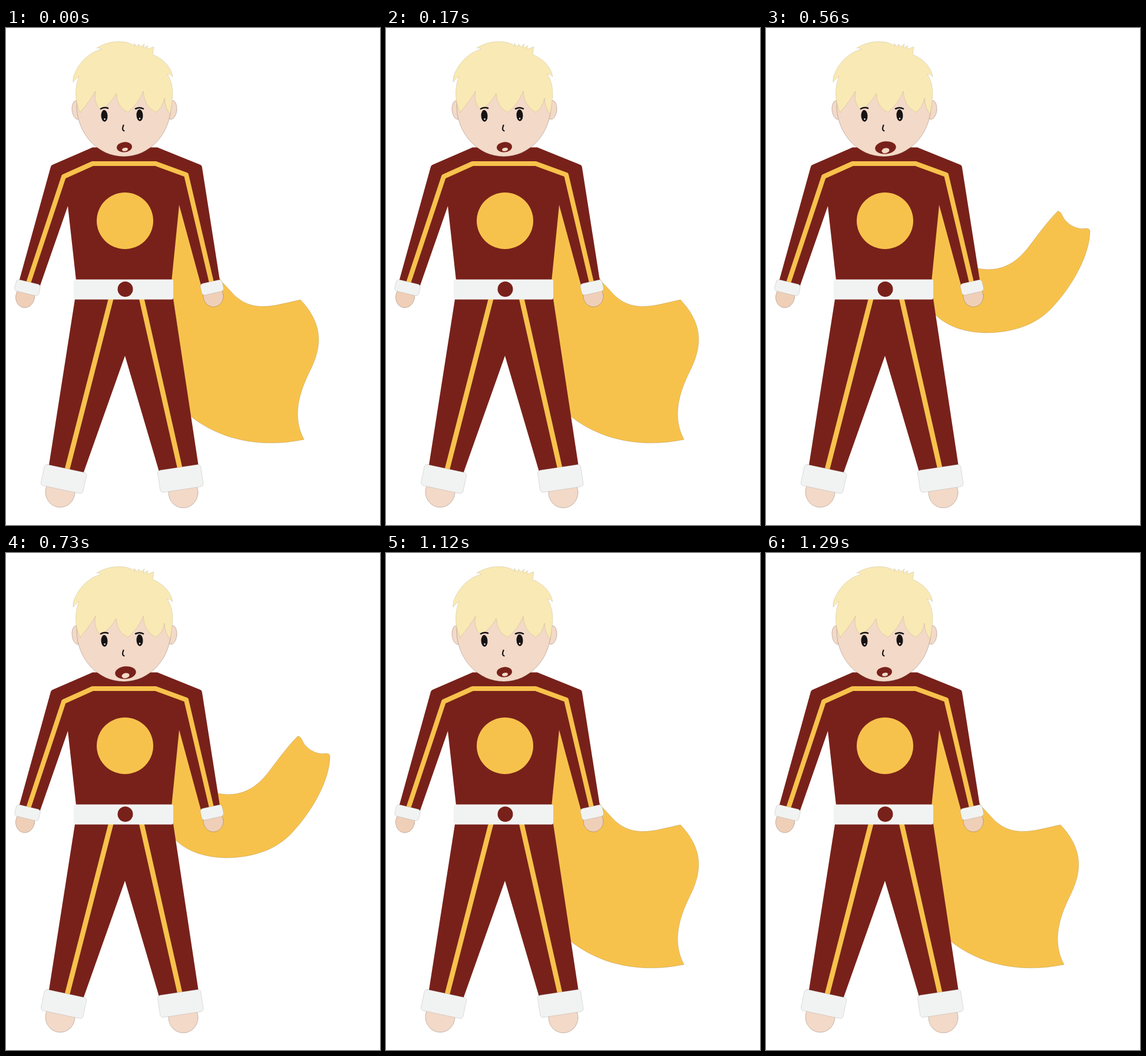
These frames come from a looping animation (635 by 843 pixels, 1.4 s). An HTML page with a canvas:

```html
<!DOCTYPE html>
<html lang="en">
<head>
<meta charset="utf-8">
<title>Caped hero</title>
<style>
  html, body { margin: 0; width: 100%; height: 100%; overflow: hidden; background: #fff; }
  canvas { display: block; }
</style>
</head>
<body>
<canvas id="stage" width="635" height="843"></canvas>
<script>
const ctx = document.getElementById('stage').getContext('2d');

const RED = '#78211a', GOLD = '#f7c24c', WHITE = '#f1f3f2';
const SKIN = '#f3d9c7', HAND = '#efcfb7', HAIR = '#f9e9b4', INK = '#161314';
const EDGE = 'rgba(60,40,30,.45)';

const STEP = 280;
const ORDER = [0, 1, 2, 1, 0];

const POSES = [
  {
    cape: `M294 296 L281 426 L284 460 L313 658 C360 696 428 714 506 698
      C488 664 494 628 513 588 C534 548 544 508 500 461
      C456 470 416 487 381 446 L367 431 L345 400 Z`,
    mouth: [201, 202, 13, 8.6], tongue: [202, 206, 5, 2.8]
  },
  {
    cape: `M294 296 L281 426 L284 460 L298 557 C345 598 400 610 460 606
      C516 603 562 585 612 572 Q615 571 614 568 C611 550 606 533 598 522
      C587 508 563 497 546 486 C526 471 514 454 516 425 Q516 419 510 422
      C478 438 440 453 416 462 C392 470 366 470 348 463
      C328 453 321 432 323 403 L318 385 Z`,
    mouth: [201.5, 202.3, 6.2, 4]
  },
  {
    cape: `M294 296 L281 426 L284 460 L288 487 C310 508 342 517 376 517
      C425 516 461 501 486 474 C519 439 549 387 550 346 Q550 339 543 340
      C531 342 517 337 507 325 C503 319 500 309 495 311
      C478 328 460 353 447 370 C423 402 396 414 361 408 L345 400 Z`,
    mouth: [203, 203, 17.8, 10.7], tongue: [203, 208, 6.6, 4.3]
  }
];

const BODY = `M147 202.5 L257 202.5 L330 232 Q332.5 233 333 237 L363 428 L346 440 L331 436
  L294 300 L281 430 L284 460 L327 744 L261 756 L202 556 L131 756 L72.5 744
  L117 460 L119 428 L105 302 L57.5 438 L22 430 L75.5 237 Q76.5 233 79 232 Z`;

const HAIR_SHAPE = `M126 143 C117 127 116 101 124 82 Q118 86 114 92
  C112 75 134 42 162 36 Q158 33 154 34 C166 26 180 23 192 23
  Q209 23 219 31 L217 26 L224 32 L225 27 L229 32 L235 27 L233 34
  L241 30 L239 36 L251 32 L249 45 C269 53 281 68 283 83 Q279 78 274 78
  Q284 94 283 116 L279 146 Q270 137 269 119 Q266 136 254 143
  Q234 132 233 107 Q225 128 207 143
  Q189 135 187 111 Q178 129 160 139
  Q148 125 152 107 Q143 123 126 143 Z`;

function shape(d, color, edge) {
  const p = new Path2D(d);
  ctx.fillStyle = color;
  ctx.fill(p);
  if (edge) {
    ctx.strokeStyle = edge;
    ctx.lineWidth = 0.6;
    ctx.stroke(p);
  }
}

function line(d, color, width) {
  ctx.strokeStyle = color;
  ctx.lineWidth = width;
  ctx.stroke(new Path2D(d));
}

function oval([x, y, rx, ry], color, turn = 0, edge) {
  ctx.beginPath();
  ctx.ellipse(x, y, rx, ry, turn, 0, Math.PI * 2);
  ctx.fillStyle = color;
  ctx.fill();
  if (edge) {
    ctx.strokeStyle = edge;
    ctx.lineWidth = 0.6;
    ctx.stroke();
  }
}

function cuff(x, y, w, h, turn) {
  ctx.save();
  ctx.translate(x, y);
  ctx.rotate(turn);
  ctx.beginPath();
  ctx.roundRect(-w / 2, -h / 2, w, h, 5);
  ctx.fillStyle = WHITE;
  ctx.fill();
  ctx.strokeStyle = 'rgba(120,110,105,.35)';
  ctx.lineWidth = 0.6;
  ctx.stroke();
  ctx.restore();
}

function drawBody() {
  oval([92, 787, 25, 26], SKIN, 0, EDGE);
  oval([301, 788, 25, 26], SKIN, 0, EDGE);
  oval([32.5, 456, 16, 18.5], HAND, 0.15, EDGE);
  oval([352, 455, 17, 18], HAND, -0.15, EDGE);
  shape(BODY, RED);

  line('M37.5 434 L98 252 L147 230 L254 230 L306 249 L349.5 434', GOLD, 8);
  line('M178.5 458 L103.5 750', GOLD, 8.5);
  line('M230 458 L296 750', GOLD, 8.5);

  cuff(36.5, 440.5, 42, 20, 0.24);
  cuff(349.7, 440, 38, 20, -0.22);
  cuff(98, 765, 73, 36.5, 0.21);
  cuff(296.2, 764, 74, 38, -0.15);

  ctx.fillStyle = WHITE;
  ctx.beginPath();
  ctx.roundRect(115, 426.5, 169, 34, 3);
  ctx.fill();

  // plain badges
  oval([202, 327, 48, 48], GOLD);
  oval([202.5, 443, 13, 13], RED);
}

function drawHead() {
  oval([120.5, 139, 8.5, 16], SKIN, -0.1, EDGE);
  oval([281.5, 139, 8.5, 16], SKIN, 0.1, EDGE);
  oval([200, 131, 80, 87], SKIN, 0, EDGE);
  shape(HAIR_SHAPE, HAIR, 'rgba(90,75,40,.25)');

  line('M161 137 Q167 133.5 173 136', INK, 2.6);
  line('M220 137 Q227 133.5 233 137', INK, 2.6);
  oval([167, 149, 5.5, 10], INK, -0.05);
  oval([227, 148, 5.5, 10], INK, -0.05);
  oval([167.5, 154.5, 1.2, 1.2], '#fff');
  oval([227, 153.5, 1.2, 1.2], '#fff');
  line('M199.5 165 Q196 173 200.5 174.5', INK, 2.2);
}

function draw(now) {
  const pose = POSES[ORDER[Math.floor(now / STEP) % ORDER.length]];
  ctx.fillStyle = '#fff';
  ctx.fillRect(0, 0, 635, 843);
  ctx.lineCap = ctx.lineJoin = 'round';

  shape(pose.cape, GOLD, 'rgba(110,80,20,.4)');
  drawBody();
  drawHead();
  oval(pose.mouth, RED, -0.1);
  if (pose.tongue) oval(pose.tongue, SKIN, -0.2);
}

const start = performance.now();
function tick() {
  draw(performance.now() - start);
  requestAnimationFrame(tick);
}
tick();
</script>
</body>
</html>
```
